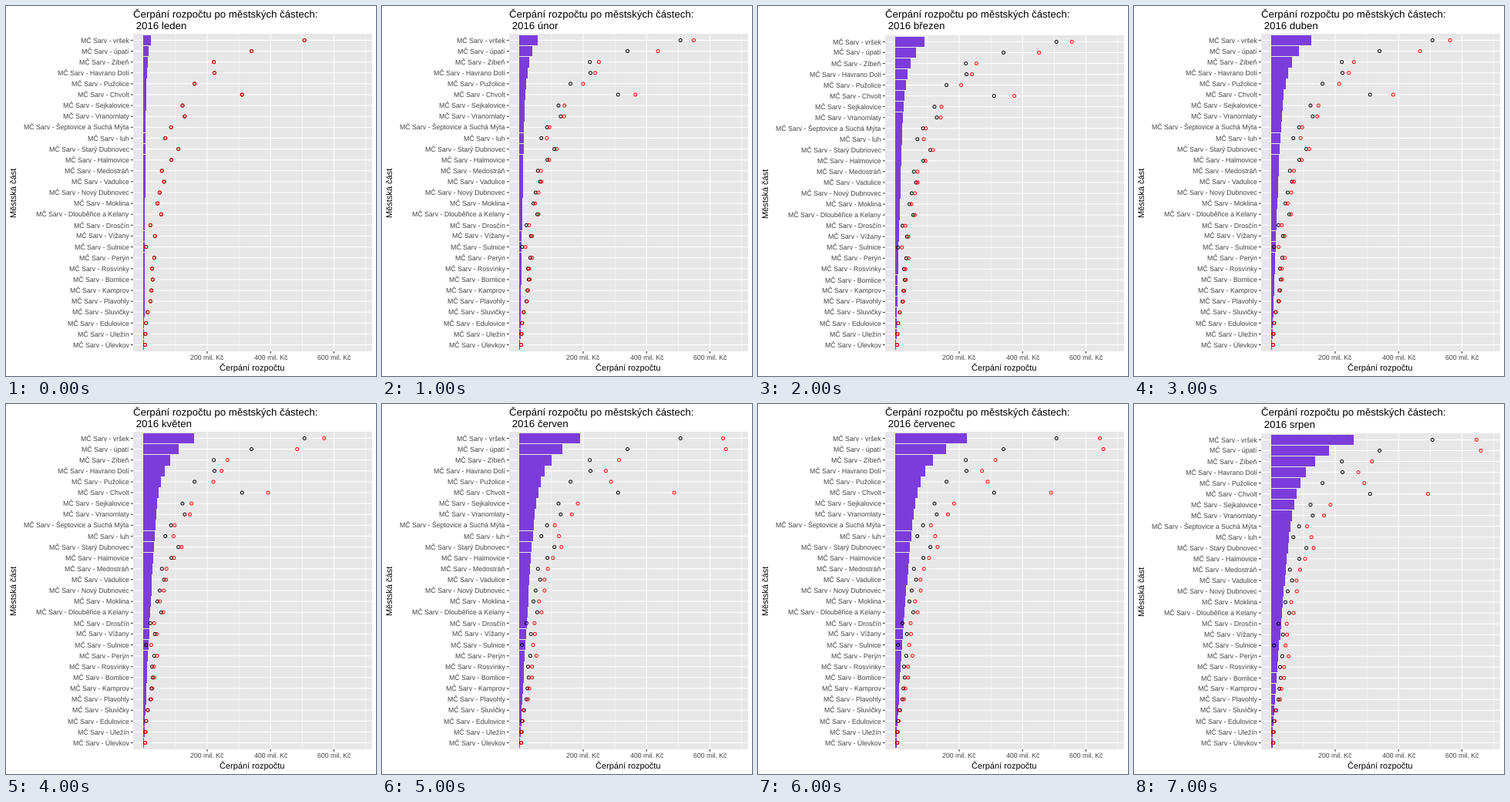
These frames come from a looping animation (480x480 px, 8 s). A matplotlib script:

```python
import matplotlib.pyplot as plt
import numpy as np
from matplotlib.animation import FuncAnimation
from matplotlib.patches import Circle, Rectangle

SIZE, DPI = 480, 80
PT = 72 / DPI                      # points per pixel
LEFT, RIGHT, BOTTOM = 164.7, 474.5, 448
ZERO, MIL = 178.8, 0.411           # x of zero, pixels per million
PURPLE, PANEL, GREY, TICK = "#7c3cdb", "#e7e7e7", "#424242", "#333333"

plt.rcParams["font.family"] = "Liberation Sans"
plt.rcParams["text.hinting"] = "no_hinting"

MONTHS = ["leden", "únor", "březen", "duben",
          "květen", "červen", "červenec", "srpen"]
LOW_TOP = {"březen", "srpen"}      # these titles push the panel down

# District, budget in the first and in the last month (millions)
PARTS = [
    ("vršek", 507, 646), ("úpatí", 340, 660), ("Zíbeň", 221, 316),
    ("Havrano Dolí", 223, 273), ("Pužolice", 160, 292),
    ("Chvolt", 310, 493), ("Sejkalovice", 122, 185),
    ("Vranomlaty", 129, 165), ("Šeptovice a Suchá Mýta", 86, 111),
    ("luh", 68, 125), ("Starý Dubnovec", 109, 132),
    ("Halmovice", 87, 105), ("Medostráň", 57, 89), ("Vadulice", 64, 78),
    ("Nový Dubnovec", 50, 79), ("Moklina", 43, 61),
    ("Dlouběřice a Kelany", 55, 69), ("Drosčín", 21, 47),
    ("Vížany", 35, 48), ("Sulnice", 7, 43), ("Perýn", 33, 53),
    ("Rosvínky", 26, 39), ("Bomlice", 28, 39), ("Kamprov", 24, 30),
    ("Plavohly", 21, 26), ("Sluvičky", 12, 14), ("Edulovice", 7, 9),
    ("Uležín", 5, 6), ("Úlevkov", 4, 5),
]
NAMES, first, last = zip(*PARTS)
FIRST, LAST = np.array(first), np.array(last)
RANK = np.arange(len(PARTS))


def budget(month):
    """Budgets are revised in two jumps, with a slow drift between."""
    share = np.interp(month, [0, 1, 4, 5, 7], [0, 0.3, 0.45, 0.97, 1])
    return FIRST + (LAST - FIRST) * share


def spent(month):
    """Spending falls off with rank and grows evenly over the months."""
    total = 175 * np.exp(-0.55 * RANK) + 83 * (1 - RANK / 28.5) ** 1.2
    return total * (0.08 + 0.92 * month / 7)


fig = plt.figure(figsize=(SIZE / DPI, SIZE / DPI), dpi=DPI, facecolor="white")
ax = fig.add_axes([0, 0, 1, 1])


def write(x, y, text, px, color="black", **kw):
    ax.text(x, y, text, fontsize=px * PT, color=color, va="baseline", **kw)


def lines(kind, at, start, end, color, px):
    kind(at, start, end, colors=color, linewidth=px * PT, zorder=1, snap=False)


def rings(values, ys, color, z):
    for value, y in zip(values, ys):
        ax.add_patch(Circle((ZERO + MIL * value, y), 2, fill=False,
                            edgecolor=color, linewidth=0.95 * PT, zorder=z))


def draw(i):
    ax.clear()
    ax.axis("off")

    top = 38 if MONTHS[i] in LOW_TOP else 36
    row = (BOTTOM - top) / (len(PARTS) + 0.2)
    ys = top + row * (0.6 + RANK)
    amounts = np.array([200, 400, 600])
    majors = ZERO + MIL * amounts
    minors = ZERO + MIL * np.arange(100, 800, 200)

    # Panel, grid and ticks
    ax.add_patch(Rectangle((LEFT, top), RIGHT - LEFT, BOTTOM - top,
                           facecolor=PANEL, linewidth=0, zorder=0))
    lines(ax.vlines, minors, top, BOTTOM, "white", 0.53)
    lines(ax.vlines, majors, top, BOTTOM, "white", 1.07)
    lines(ax.hlines, ys, LEFT, RIGHT, "white", 1.07)
    lines(ax.hlines, ys, LEFT - 2.75, LEFT, TICK, 1.07)
    lines(ax.vlines, majors, BOTTOM, BOTTOM + 2.75, TICK, 1.07)

    # Data
    ax.barh(ys, MIL * spent(i), height=0.9 * row, left=ZERO, color=PURPLE,
            linewidth=0, zorder=2, snap=False, antialiased=False)
    rings(FIRST, ys, "black", 3)
    rings(budget(i), ys, "red", 4)

    # Text
    write(LEFT, 15, "Čerpání rozpočtu po městských částech:", 13.2)
    write(LEFT, 30, f" 2016 {MONTHS[i]}", 13.2)
    for name, y in zip(NAMES, ys):
        write(159.7, y + 3.1, f"MČ Sarv - {name}", 8.8, GREY, ha="right")
    for x, amount in zip(majors, amounts):
        write(x, 459.3, f"{amount} mil. Kč", 8.8, GREY, ha="center")
    write((LEFT + RIGHT) / 2, 473, "Čerpání rozpočtu", 11, ha="center")
    write(14, (top + BOTTOM) / 2, "Městská část", 11, ha="center",
          rotation=90, rotation_mode="anchor")
    ax.set(xlim=(0, SIZE), ylim=(SIZE, 0))
    return []


anim = FuncAnimation(fig, draw, frames=len(MONTHS), interval=1000, repeat=True)
plt.show()
```
